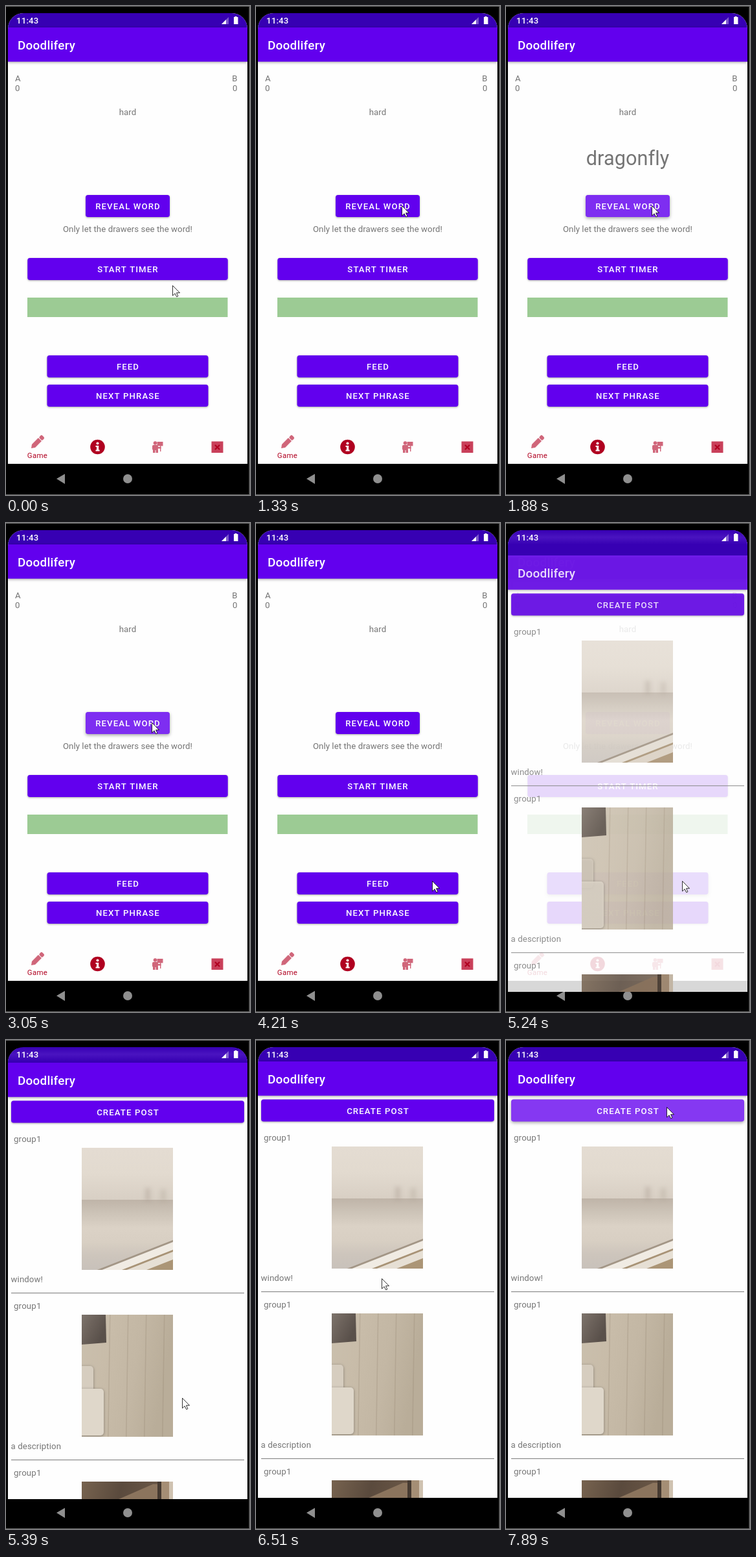
Animation, 377 px wide and 753 px high, one loop 8 s. Source, as an HTML page with a canvas:

```html
<!DOCTYPE html>
<html lang="en">
<head>
<meta charset="utf-8">
<title>Drawing game</title>
<style>
html, body { margin: 0; width: 100%; height: 100%; overflow: hidden; background: #000; }
canvas { display: block; width: 377px; height: 753px; }
</style>
</head>
<body>
<canvas id="stage" width="377" height="753"></canvas>
<script>
const ctx = document.getElementById('stage').getContext('2d');
const LOOP = 8000, FRAME = 120;
const PURPLE = '#6200ee', DARK = '#3700b3', GREY = '#757575', RED = '#b00020', PALE = '#d0667a';
const SCREEN = { x: 3, y: 11, w: 370, bottom: 705 };
const MID = SCREEN.x + SCREEN.w / 2;

const REVEAL = 1730, RELEASE = 3050, FEED_TAP = 4860, OPEN = 5240, POST_TAP = 7770;

// Pointer glides, each sampled once per FRAME
const HOME = { x: 257, y: 430 };
const GLIDES = [
  { at: 910, steps: 4, x: 225, y: 307 },
  { at: 3430, steps: 1, x: 242, y: 307 },
  { at: 3580, steps: 3, x: 281, y: 482 },
  { at: 3960, steps: 3, x: 272, y: 551 },
  { at: 5820, steps: 3, x: 194, y: 382 },
  { at: 6510, steps: 1, x: 194, y: 367 },
  { at: 6790, steps: 3, x: 239, y: 100 },
  { at: 7350, steps: 1, x: 248, y: 103 }
];

const easeOut = p => 1 - (1 - p) ** 1.5;
const between = (t, from, to) => t >= from && t < to;

function pointerAt(t) {
  let pos = HOME;
  for (const g of GLIDES) {
    if (t < g.at) break;
    const step = Math.min(g.steps, Math.floor((t - g.at) / FRAME) + 1);
    const p = easeOut(step / g.steps);
    pos = { x: pos.x + (g.x - pos.x) * p, y: pos.y + (g.y - pos.y) * p };
  }
  return pos;
}

function rect(x, y, w, h, fill) {
  ctx.fillStyle = fill;
  ctx.fillRect(x, y, w, h);
}

function poly(points, fill) {
  ctx.beginPath();
  points.forEach(([x, y]) => ctx.lineTo(x, y));
  ctx.closePath();
  ctx.fillStyle = fill;
  ctx.fill();
}

function disc(x, y, r, fill) {
  ctx.beginPath();
  ctx.arc(x, y, r, 0, Math.PI * 2);
  ctx.fillStyle = fill;
  ctx.fill();
}

function round(x, y, w, h, r, fill) {
  ctx.beginPath();
  ctx.roundRect(x, y, w, h, r);
  ctx.fillStyle = fill;
  ctx.fill();
}

// Evenly spaced stops
function gradient(x, y, ...colors) {
  const g = ctx.createLinearGradient(0, 0, x, y);
  colors.forEach((c, i) => g.addColorStop(i / (colors.length - 1), c));
  return g;
}

function shadow(blur, offset) {
  ctx.shadowColor = 'rgba(0,0,0,.35)';
  ctx.shadowBlur = blur;
  ctx.shadowOffsetY = offset;
}

function text(str, x, y, { size = 13.2, weight = 400, color = GREY, align = 'left', gap = 0.08 } = {}) {
  ctx.font = `${weight} ${size}px Roboto, sans-serif`;
  ctx.letterSpacing = gap + 'px';
  ctx.textAlign = align;
  ctx.fillStyle = color;
  ctx.fillText(str, x, y);
}

// glow is the strength of the touch highlight
function button(label, y, w, glow = 0) {
  const x = MID - w / 2, h = 34;
  ctx.save();
  shadow(glow ? 5 : 3, glow ? 2 : 1);
  round(x, y, w, h, 3.8, PURPLE);
  ctx.restore();
  if (glow) round(x, y, w, h, 3.8, `rgba(255,255,255,${glow})`);
  text(label, MID + 0.5, y + 22, { weight: 500, color: '#fff', align: 'center', gap: 1.1 });
}

// Highlight that builds up over a few frames after a tap
function tapGlow(t, start, steps, full) {
  return t < start ? 0 : full * Math.min(1, (Math.floor((t - start) / FRAME) + 1) / steps);
}

function page() {
  rect(SCREEN.x, SCREEN.y, SCREEN.w, SCREEN.bottom - SCREEN.y, '#fefefe');
  rect(SCREEN.x, SCREEN.y, SCREEN.w, 22, DARK);
  ctx.save();
  shadow(4, 1);
  rect(SCREEN.x, 33, SCREEN.w, 52.7, PURPLE);
  ctx.restore();
  text('Doodlifery', 18, 67, { size: 18.9, weight: 500, color: '#fff', gap: 0.23 });
}

function statusIcons() {
  text('11:43', 16, 27, { weight: 500, color: '#fff', gap: 0.2 });
  poly([[333, 28], [344, 17], [344, 28]], 'rgba(255,255,255,.35)');
  poly([[333, 28], [340, 21], [340, 28]], '#fff');
  rect(353.5, 16, 3, 2, '#fff');
  rect(352, 17, 6.5, 11, '#fff');
}

function pencil(x, y) {
  ctx.save();
  ctx.translate(x, y);
  ctx.rotate(-Math.PI / 4);
  poly([[0, 0], [5, -3.6], [19, -3.6], [19, 3.6], [5, 3.6]], PALE);
  round(20, -3.6, 6, 7.2, 2, PALE);
  ctx.restore();
}

function info(x, y) {
  disc(x, y, 11.3, RED);
  disc(x, y - 5.5, 2, '#fff');
  rect(x - 3, y - 2, 4.5, 2, '#fff');
  rect(x - 1.5, y - 2, 3.2, 8, '#fff');
  rect(x - 3, y + 4.5, 6.2, 2, '#fff');
}

function flagBearer(x, y) {
  disc(x, y - 6, 2.8, PALE);
  round(x - 4.5, y - 3, 9, 8, 2, PALE);
  rect(x - 3.5, y + 4, 3.5, 5, PALE);
  rect(x + 1, y + 4, 3.5, 5, PALE);
  rect(x + 3, y - 8, 9, 6.5, PALE);
  rect(x + 7.5, y - 8, 1.4, 15, PALE);
  rect(x + 4, y, 5, 2.5, PALE);
}

function closeBox(x, y) {
  rect(x - 9, y - 9, 18, 17.5, '#c9405a');
  ctx.save();
  ctx.translate(x, y);
  ctx.rotate(Math.PI / 4);
  rect(-5, -1.1, 10, 2.2, RED);
  rect(-1.1, -5, 2.2, 10, RED);
  ctx.restore();
}

function gamePage(t) {
  page();
  [['A', 116], ['0', 131]].forEach(([s, y]) => text(s, 14, y));
  [['B', 116], ['0', 131]].forEach(([s, y]) => text(s, 357.5, y, { align: 'right' }));
  text('hard', MID, 168, { align: 'center' });
  if (between(t, REVEAL, RELEASE)) text('dragonfly', MID, 245, { size: 30.6, align: 'center' });

  button('REVEAL WORD', 291, 130, between(t, REVEAL + FRAME, RELEASE + FRAME) ? 0.18 : 0);
  text('Only let the drawers see the word!', MID, 348, { align: 'center' });
  button('START TIMER', 388, 309.5);
  rect(MID - 155, 449, 309.5, 30, '#9ccb94');
  button('FEED', 538, 249, tapGlow(t, FEED_TAP, 3, 0.12));
  button('NEXT PHRASE', 583, 249);

  pencil(39, 681);
  text('Game', 48.5, 696, { size: 11.4, color: RED, align: 'center', gap: 0.35 });
  info(141.5, 679);
  flagBearer(230.5, 679);
  closeBox(326.5, 679.5);
}

// Photos are drawn in a 141 x 188 box
function windowPhoto() {
  rect(0, 0, 141, 80, gradient(0, 80, '#e4dcd2', '#e2dacf', '#d8cfc4'));
  ctx.save();
  ctx.translate(0, 80);
  rect(0, 0, 141, 108, gradient(0, 108, '#bfb4a8', '#cdc4b8', '#dbd2c6', '#d8cfc3', '#cdc5bc', '#c8c1ba'));
  ctx.restore();
  ctx.save();
  ctx.filter = 'blur(3px)';
  rect(98, 62, 8, 20, 'rgba(170,158,146,.4)');
  rect(122, 64, 8, 18, 'rgba(170,158,146,.3)');
  ctx.restore();
  ['#a39686', '#f0ebe3', '#a89376', '#e6dfd4', '#ab9576'].forEach((c, i) => {
    const y = 142 + 15 * (i >> 1) + 3 * (i % 2);
    poly([[141, y], [141, 188], [141 - (188 - y) * 2.55, 188]], c);
  });
}

function wallPhoto() {
  rect(0, 0, 141, 188, gradient(141, 25, '#cabfad', '#c8bca9', '#c3b7a4', '#b9ad99'));
  for (let i = 0; i < 4; i++) {
    const x = 43 + 28 * i;
    poly([[x, 0], [x + 1.5, 0], [x - 1.5, 188], [x - 3, 188]], 'rgba(140,125,105,.25)');
  }
  poly([[0, 0], [37, 0], [38, 43], [0, 46]], gradient(38, 20, '#7d736b', '#6b615a', '#59504a'));
  ctx.save();
  shadow(4, 1);
  round(-6, 79, 24, 45, 5, '#d6cdbf');
  round(-6, 114, 40, 72, 5, gradient(34, 20, '#d3cabc', '#dfd7ca'));
  ctx.restore();
}

function shelfPhoto() {
  rect(0, 0, 141, 28, gradient(118, 30, '#77634f', '#5a4a3d', '#6b5847'));
  poly([[55, 28], [110, 4], [118, 4], [118, 28]], '#8b745d');
  rect(117, 0, 6, 28, '#463a31');
  rect(123, 0, 12, 28, '#a58e75');
  rect(135, 0, 6, 28, '#cfc2b1');
}

function post(index, photo, caption) {
  const y = 155 + 257 * index;
  text('group1', 12, y, { gap: 0.2 });
  ctx.save();
  ctx.beginPath();
  ctx.rect(117, y + 9, 141, 188);
  ctx.clip();
  ctx.translate(117, y + 9);
  photo();
  ctx.restore();
  text(caption, 7.5, y + 216, { gap: 0.13 });
  rect(8, y + 232, 360, 1.2, '#8c8c8c');
}

function feedPage(t) {
  ctx.save();
  ctx.beginPath();
  ctx.rect(SCREEN.x, SCREEN.y, SCREEN.w, SCREEN.bottom - SCREEN.y);
  ctx.clip();
  page();
  button('CREATE POST', 91.5, 360, tapGlow(t, POST_TAP, 2, 0.22));
  post(0, windowPhoto, 'window!');
  post(1, wallPhoto, 'a description');
  post(2, shelfPhoto, '');
  ctx.restore();
}

function systemNav() {
  rect(SCREEN.x, SCREEN.bottom, SCREEN.w, 48, '#000');
  poly([[78, 728], [91, 720.5], [91, 736]], '#8f8f8f');
  disc(188, 728, 7, '#8f8f8f');
}

// The feed fades in while sliding up, seen in two steps
function slideIn(t) {
  const first = t < OPEN + 150;
  const shift = first ? 17 : 2;
  if (first) gamePage(t);
  systemNav();
  ctx.save();
  ctx.globalAlpha = first ? 0.85 : 1;
  ctx.translate(0, shift);
  feedPage(t);
  ctx.restore();
  ctx.save();
  ctx.translate(0, SCREEN.y);
  rect(SCREEN.x, 0, SCREEN.w, 22 + shift, gradient(0, 22, DARK, '#4a14c0', DARK));
  ctx.restore();
}

function pointer({ x, y }) {
  ctx.save();
  ctx.translate(x + 0.5, y + 0.5);
  poly([[0, 0], [0, 15.5], [3.6, 12.2], [6.2, 17.3], [8.4, 16.3], [6, 11.2], [11, 11.2]], '#fff');
  ctx.strokeStyle = '#000';
  ctx.lineWidth = 0.8;
  ctx.stroke();
  ctx.restore();
}

function draw(t) {
  rect(0, 0, 377, 753, '#6a6a6a');
  rect(0, 1, 375.5, 751, '#000');

  ctx.save();
  ctx.beginPath();
  ctx.roundRect(SCREEN.x, SCREEN.y, SCREEN.w, 740, 24);
  ctx.clip();
  if (between(t, OPEN, OPEN + 300)) slideIn(t);
  else {
    (t < OPEN ? gamePage : feedPage)(t);
    systemNav();
  }
  statusIcons();
  ctx.restore();
  pointer(pointerAt(t));
}

const start = performance.now();
function tick() {
  draw((performance.now() - start) % LOOP);
  requestAnimationFrame(tick);
}
tick();
</script>
</body>
</html>
```
